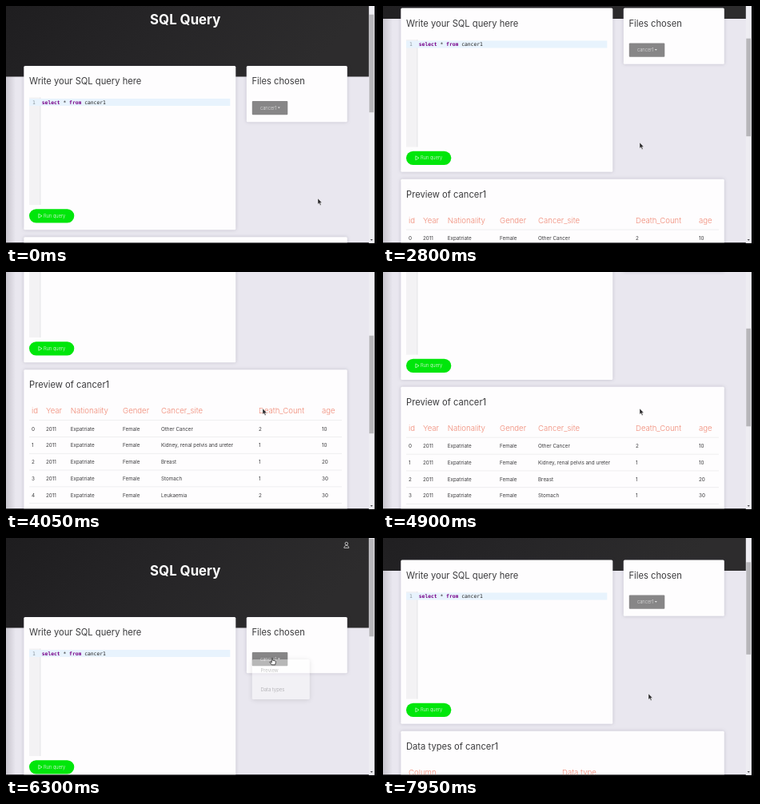
These frames come from a looping animation (464x298 px, 8 s). An HTML page:

```html
<!DOCTYPE html>
<html lang="en">
<head>
<meta charset="utf-8">
<title>SQL Query</title>
<style>
@property --s { syntax: "<number>"; inherits: true; initial-value: 24; }
html, body { margin: 0; width: 100%; height: 100%; overflow: hidden; background: #000; }
svg { display: block; width: 464px; height: 298px; animation: scroll 8s linear infinite; }
text { font-family: Inter, "Open Sans", sans-serif; fill: #3b3b3d; white-space: pre; }
.title { font-size: 16.8px; font-weight: 700; fill: #fff; text-anchor: middle; }
.h { font-size: 11.2px; }
.th { font-size: 9.6px; font-weight: 300; fill: #f08a76; }
.td { font-size: 6.3px; }
.btn { font-size: 5.7px; font-weight: 300; fill: #f4f4f4; }
.item { font-size: 6px; font-weight: 300; fill: #444; }
.code { font: 6.33px "DejaVu Sans Mono", monospace; fill: #222; }
.kw { fill: #708; font-weight: 700; }
.card { fill: #fefdfe; filter: drop-shadow(0 .7px 2px rgba(60, 55, 80, .22)); }
.line { stroke: #e2e2e4; stroke-width: .6; }

#page { transform: translateY(calc(var(--s) * -1px)); }
#thumb { transform: translateY(calc(var(--s) * .413px)); }
#cursor { animation: move 8s ease-in-out infinite; }
#arrow { animation: arrow 8s step-end infinite; }
#hand { animation: hand 8s step-end infinite; }
#menu { animation: menu 8s linear infinite; }
#pick { animation: pick 8s linear infinite; }
#preview { animation: preview 8s step-end infinite; }
#types { animation: types 8s step-end infinite; }
#thumb rect { animation: thumb 8s step-end infinite; }

@keyframes scroll {
  0% { --s: 24; }
  31.25% { --s: 24; animation-timing-function: ease-in-out; }
  39.4% { --s: 191; }
  58% { --s: 191; animation-timing-function: ease-out; }
  62.25% { --s: 167.5; }
  64.375% { --s: 167.5; animation-timing-function: ease-in; }
  66.875% { --s: 53.5; animation-timing-function: ease-out; }
  70% { --s: 0; }
  93.75% { --s: 0; animation-timing-function: ease-in-out; }
  99.3%, 100% { --s: 71.5; }
}
@keyframes move {
  0%, .3% { transform: translate(390px, 241px); }
  11.25%, 14% { transform: translate(342px, 131px); }
  19.375%, 25.7% { transform: translate(333px, 152px); }
  30.6%, 68.75% { transform: translate(321px, 171px); }
  73.75%, 79.4% { transform: translate(333px, 150px); }
  84.4%, 100% { transform: translate(332px, 195px); }
}
@keyframes arrow {
  0%, 25.3%, 89% { visibility: visible; }
  10%, 73% { visibility: hidden; }
}
@keyframes hand {
  0%, 25.3%, 89% { visibility: hidden; }
  10%, 73% { visibility: visible; }
}
@keyframes menu {
  0%, 14% { opacity: 0; transform: translateY(-10px); }
  17.2%, 25.3% { opacity: 1; transform: none; }
  25.31%, 77.5% { opacity: 0; transform: translateY(-10px); }
  80.6%, 89% { opacity: 1; transform: none; }
  89.01%, 100% { opacity: 0; transform: translateY(-10px); }
}
@keyframes pick {
  0%, 25.2%, 28.8%, 100% { fill: #878687; }
  25.6% { fill: #969596; }
}
@keyframes preview {
  0% { visibility: visible; }
  89%, 100% { visibility: hidden; }
}
@keyframes types {
  0% { visibility: hidden; }
  89%, 100% { visibility: visible; }
}
@keyframes thumb {
  0% { height: 122.5px; }
  89%, 100% { height: 115.5px; }
}
</style>
</head>
<body>
<svg viewBox="0 0 464 298">
  <defs>
    <linearGradient id="dark" x2="1" y2=".25">
      <stop offset="0" stop-color="#1e1d1f"/>
      <stop offset=".5" stop-color="#262527"/>
      <stop offset="1" stop-color="#2d2c2d"/>
    </linearGradient>
    <linearGradient id="edge">
      <stop offset="0" stop-color="#77737c" stop-opacity=".3"/>
      <stop offset="1" stop-color="#77737c" stop-opacity="0"/>
    </linearGradient>
    <clipPath id="view"><path d="M0 0H460.5V296.3H0z"/></clipPath>
  </defs>
  <rect width="464" height="298" fill="#050506"/>
  <g clip-path="url(#view)">
    <rect width="461" height="297" fill="#e9e7ef"/>
    <rect width="12" height="297" fill="url(#edge)"/>
    <g id="page">
      <rect width="454" height="112.5" fill="url(#dark)"/>
      <g fill="none" stroke="#d8d8d8" stroke-width=".8">
        <circle cx="425.8" cy="7" r="1.8"/>
        <path d="M422.8 12.4c0-4 6-4 6 0z"/>
      </g>
      <text class="title" x="224.2" y="47">SQL Query</text>

      <rect class="card" x="22.3" y="99" width="265" height="205.3" rx="1.5"/>
      <text class="h" x="29" y="122.2">Write your SQL query here</text>
      <rect x="29" y="138.5" width="14" height="134.5" fill="#f3f2f4"/>
      <path d="M43 138.5v134.5" stroke="#d9d8dc" stroke-width=".6"/>
      <rect x="29" y="140" width="251.3" height="9" fill="#e8f3fd"/>
      <text class="code" x="33" y="146.8" style="fill:#8a949c">1</text>
      <text class="code" x="44.8" y="146.8"><tspan class="kw">select</tspan> * <tspan class="kw">from</tspan> cancer1</text>
      <rect x="29" y="278.2" width="56.3" height="17.3" rx="8.65" fill="#00e60b"/>
      <path d="M40.8 284.3l4.2 2.5-4.2 2.5z" fill="none" stroke="#fff" stroke-width=".6"/>
      <text class="btn" x="47" y="288.9">Run query</text>

      <rect class="card" x="300.8" y="99" width="126" height="70.2" rx="1.5"/>
      <text class="h" x="307.5" y="122.2">Files chosen</text>
      <rect id="pick" x="307.8" y="143" width="44.5" height="17.2" rx="1"/>
      <text class="btn" x="318" y="153.7" style="fill:#e4e4e4">cancer1</text>
      <path d="M339.8 150.6h3l-1.5 1.7z" fill="#e4e4e4"/>

      <rect class="card" x="22.3" y="313.2" width="404.5" height="180" rx="1.5"/>
      <g id="preview"><text class="h" x="29" y="336.4">Preview of cancer1</text></g>
      <g id="types"><text class="h" x="29" y="336.4">Data types of cancer1</text></g>

      <g id="menu">
        <rect x="307.8" y="158" width="72" height="50" rx="1.5" fill="#fff" style="filter:drop-shadow(0 1px 3px rgba(0,0,0,.28))"/>
        <text class="item" x="318.5" y="173.8">Preview</text>
        <text class="item" x="318.5" y="198.2">Data types</text>
      </g>
    </g>
    <rect x="453.8" width="7" height="297" fill="#eeedf2"/>
    <g id="thumb"><rect x="454.3" y=".8" width="5.6" height="122.5" fill="#b7b6ba"/></g>
    <path d="M455.6 292h3.2l-1.6 1.9z" fill="#4c4c50"/>
  </g>
  <g id="cursor">
    <path id="arrow" d="M0 0V7.2L1.7 5.7 2.9 8.4 4.1 7.9 2.9 5.2H5.1z" fill="#2c2b2d" stroke="#fff" stroke-opacity=".75" stroke-width=".5"/>
    <path id="hand" d="M-.7 .7Q0-.3 .7 .7V3.3L3.9 4Q4.6 4.3 4.4 5.3L3.7 8.8H-.6L-3 5.7Q-3.1 4.6-2 4.9L-.7 6z" fill="#fff" stroke="#222" stroke-width=".8" stroke-linejoin="round"/>
  </g>
</svg>
<script>
const NS = "http://www.w3.org/2000/svg";

function add(parent, tag, attrs, label) {
  const el = document.createElementNS(NS, tag);
  for (const key in attrs) el.setAttribute(key, attrs[key]);
  if (label !== undefined) el.textContent = label;
  parent.append(el);
}

function table(parent, xs, heads, rows) {
  const rule = y => add(parent, "path", { class: "line", d: `M29 ${y}H420` });
  heads.forEach((h, i) => add(parent, "text", { class: "th", x: xs[i], y: 368.3 }, h));
  rule(376.6);
  rows.forEach((row, r) => {
    const y = 387.2 + r * 20.75;
    row.forEach((v, i) => add(parent, "text", { class: "td", x: xs[i], y: y + 2.3 }, v));
    rule(y + 10.4);
  });
}

const cases = [["Other Cancer", 2, 10], ["Kidney, renal pelvis and ureter", 1, 10],
  ["Breast", 1, 20], ["Stomach", 1, 30], ["Leukaemia", 2, 30]];
table(document.getElementById("preview"), [32, 50, 80.7, 146, 194, 316, 395],
  ["id", "Year", "Nationality", "Gender", "Cancer_site", "Death_Count", "age"],
  cases.map((c, i) => [i, 2011, "Expatriate", "Female", ...c]));
table(document.getElementById("types"), [32, 224], ["Column", "Data type"], []);
</script>
</body>
</html>
```
